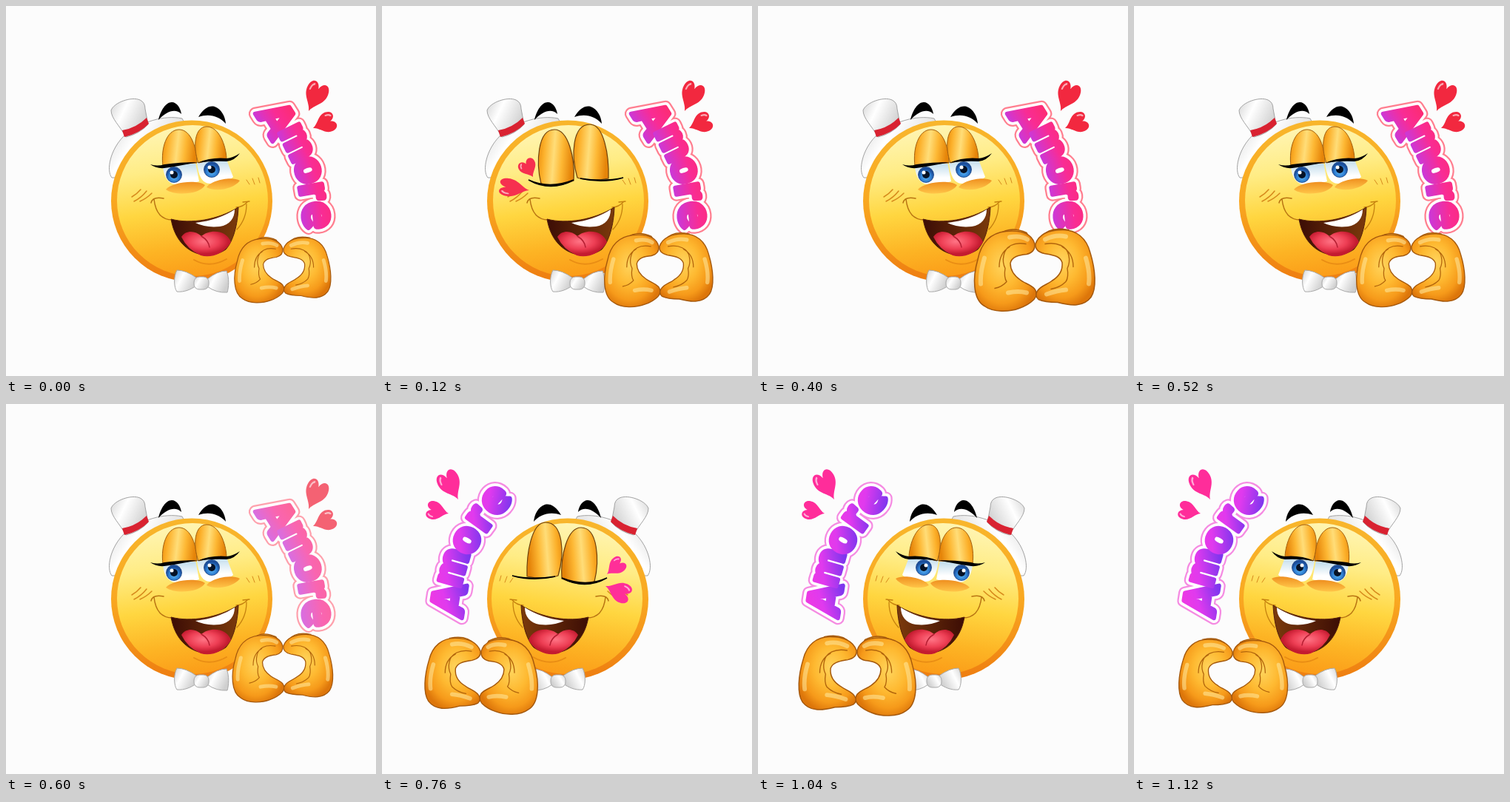
An HTML page for the animation above (1160 ms loop, 500x500 px).

```html
<!DOCTYPE html>
<html lang="it">
<head>
<meta charset="utf-8">
<title>Amore</title>
<style>
html, body { margin: 0; width: 100%; height: 100%; overflow: hidden; background: #fcfcfc; }
svg { display: block; width: 100vw; height: 100vh; }
text { font-family: Lato, "Open Sans", sans-serif; font-weight: 900; text-anchor: middle; stroke-linejoin: round; }
.line { fill: none; stroke-linecap: round; stroke-linejoin: round; }
</style>
</head>
<body>
<svg viewBox="0 0 500 500">
  <defs>
    <linearGradient id="rim" x2="0" y2="1">
      <stop offset="0" stop-color="#f8b62c"/><stop offset=".5" stop-color="#f9a821"/><stop offset="1" stop-color="#ee7d10"/>
    </linearGradient>
    <linearGradient id="skin" x1=".4" x2=".55" y2="1">
      <stop offset="0" stop-color="#fff5b4"/><stop offset=".28" stop-color="#ffec85"/>
      <stop offset=".55" stop-color="#ffd640"/><stop offset=".8" stop-color="#fdb424"/><stop offset="1" stop-color="#fb9c18"/>
    </linearGradient>
    <linearGradient id="lid" y2=".12">
      <stop offset="0" stop-color="#e98a0c"/><stop offset=".2" stop-color="#fcb02a"/>
      <stop offset=".48" stop-color="#ffdd78"/><stop offset=".72" stop-color="#fdb733"/><stop offset="1" stop-color="#e58409"/>
    </linearGradient>
    <linearGradient id="bag" x2="0" y2="1">
      <stop offset="0" stop-color="#ef8f20"/><stop offset="1" stop-color="#ffc548"/>
    </linearGradient>
    <linearGradient id="cloth" x2="1" y2=".5">
      <stop offset="0" stop-color="#d4d4d4"/><stop offset=".4" stop-color="#fff"/><stop offset="1" stop-color="#cfcfcf"/>
    </linearGradient>
    <linearGradient id="white" x2="0" y2="1">
      <stop offset="0" stop-color="#b9d8ea"/><stop offset=".7" stop-color="#fff"/>
    </linearGradient>
    <linearGradient id="mouth">
      <stop offset="0" stop-color="#3c0d05"/><stop offset="1" stop-color="#7b3a0c"/>
    </linearGradient>
    <radialGradient id="iris" cy=".65">
      <stop offset="0" stop-color="#5db7f5"/><stop offset=".65" stop-color="#2f7fd2"/><stop offset="1" stop-color="#1c4f9c"/>
    </radialGradient>
    <radialGradient id="tongue" cx=".45" cy=".4">
      <stop offset="0" stop-color="#ff7586"/><stop offset=".6" stop-color="#ee3f55"/><stop offset="1" stop-color="#c41b30"/>
    </radialGradient>
    <radialGradient id="hand" cx=".45" cy=".42" r=".62">
      <stop offset="0" stop-color="#ffd45c"/><stop offset=".45" stop-color="#feb931"/>
      <stop offset=".78" stop-color="#f69a1a"/><stop offset="1" stop-color="#dd760a"/>
    </radialGradient>
    <linearGradient id="warm" x2="0" y2="1">
      <stop offset="0" stop-color="#ff2c62"/><stop offset=".5" stop-color="#f92c94"/><stop offset="1" stop-color="#b93df2"/>
    </linearGradient>
    <linearGradient id="cool" x2=".3" y2="1">
      <stop offset="0" stop-color="#fb38d8"/><stop offset=".55" stop-color="#e03aee"/><stop offset="1" stop-color="#7f36ee"/>
    </linearGradient>
  </defs>

  <g id="rightWord"></g>
  <g id="leftWord"></g>

  <g id="head">
    <g fill="url(#cloth)" stroke="#a3a3a3">
      <path d="M143 232C135 222 141 194 159 176C182 156 214 147 238 152L248 170L160 232Z"/>
      <path d="M142 141C146 130 170 122 181 127Q188 130 188 139L192 160Q180 173 162 177C154 162 142 152 142 141Z"/>
      <path d="M157 168Q176 165 190 151L193 159Q181 172 160 177Z" fill="#d92231" stroke="none"/>
    </g>
    <path d="M206 154C209 141 216 130 224 130C231 130 236 138 237 146C229 138 217 142 206 154Z"/>
    <path d="M260 150C267 138 275 134 282 136C291 139 296 149 297 159C288 149 275 145 260 150Z"/>
    <circle cx="251" cy="263.500" r="109" fill="url(#rim)"/>
    <circle cx="252" cy="263" r="102" fill="url(#skin)"/>
    <g class="line" stroke="#d6891c" stroke-width="1.500">
      <path d="M170 258Q177 254 182 248M173 264Q183 259 190 250M181 264Q190 260 197 253"/>
      <path d="M325 235L329 241M333 233L336 241M341 232L343 239" stroke-width="1"/>
      <path d="M254 343Q275 355 298 342" stroke="#e98d14" stroke-width="2"/>
    </g>

    <g id="open">
      <path d="M212 215C213 233 220 242 234 241Q250 241 261 237L256 211Z" fill="url(#white)"/>
      <path d="M258 211C260 228 264 240 276 240Q298 240 307 231L297 205Z" fill="url(#white)"/>
      <g id="irises"></g>
      <path d="M216 248C224 238 258 234 269 242C262 255 228 257 216 248Z" fill="url(#bag)"/>
      <path d="M271 245C276 236 305 229 316 236C308 247 284 252 271 245Z" fill="url(#bag)"/>
      <g fill="url(#lid)" stroke="#a35f0d">
        <path d="M212 216C209 192 217 167 234 167C250 167 258 192 258 212Q234 213 212 216Z"/>
        <path d="M260 212C252 190 255 163 271 163C288 163 297 188 298 206Q278 207 260 212Z"/>
      </g>
      <path d="M195 214Q205 217 214 214Q235 211 259 211Q235 216 214 219Q203 220 195 214Z"/>
      <path d="M258 212Q278 204 298 206Q307 205 316 199Q309 209 298 210Q278 209 258 212Z"/>
    </g>

    <g id="shut">
      <g fill="url(#lid)" stroke="#6e400c" stroke-width="1.200">
        <path d="M215 240C208 212 210 167 233 167C252 167 261 206 259 236Q235 247 215 240Z"/>
        <path d="M264 232C255 202 257 160 281 160C300 160 307 202 306 233Q282 238 264 232Z"/>
      </g>
      <path d="M198 235Q226 248 259 235Q228 252 198 235Z" stroke="#000" stroke-width="1.500"/>
      <path d="M268 233Q300 238 326 232Q298 240 268 233Z" stroke="#000" stroke-width="1.500"/>
    </g>

    <path class="line" d="M196 266Q198 257 213 260M200 261C202 279 210 289 225 289" stroke="#b87412" stroke-width="1.500"/>
    <path class="line" d="M311 272Q320 272 327 264M320 265L329 264M325 268Q325 288 312 302" stroke="#c5810f" stroke-width="1.300"/>
    <path d="M223 288C250 295 286 289 314 272C313 296 307 318 297 329C272 346 231 335 223 288Z" fill="url(#mouth)" stroke="#54200a"/>
    <path d="M237 312C244 302 256 304 264 311C274 302 297 301 304 319C294 336 276 341 263 337Q245 329 237 312Z" fill="url(#tongue)"/>
    <path class="line" d="M264 311Q274 317 275 326" stroke="#b51e32" stroke-width="1.500"/>
    <path d="M256 293Q288 289 309 275C309 287 302 296 289 298Q270 300 256 293Z" fill="#fff"/>
    <g fill="url(#cloth)" stroke="#a9a9a9">
      <path d="M231 357C226 366 227 381 231 386C241 387 250 383 257 378L257 367Q243 357 231 357Z"/>
      <path d="M272 369Q286 358 298 358C302 368 301 380 299 387Q284 388 272 379Z"/>
      <rect x="254" y="366" width="20" height="17" rx="7"/>
    </g>
  </g>

  <g id="rightHearts"></g>
  <g id="leftHearts"></g>

  <g id="hands">
    <g fill="url(#hand)" stroke="#a4580c" stroke-width="1.500">
      <path d="M325 308Q342 296 363 306L369 316Z"/>
      <path d="M383 311Q395 297 419 302L400 314Z"/>
      <path d="M374 321C370 307 355 302 335 304C316 306 302 317 297 342C290 366 290 396 306 405C318 414 340 413 353 408Q365 404 373 396Q379 389 374 382C369 376 360 374 355 370C346 364 341 356 341 347C343 338 353 336 363 335Q375 332 374 321Z"/>
      <path d="M375 321C380 307 395 302 412 302C430 302 444 313 449 333C456 356 458 381 450 393C440 406 424 405 405 400Q387 400 379 396Q373 391 378 384C383 377 391 376 397 371C407 365 412 356 411 346C408 337 398 336 387 334Q374 331 375 321Z"/>
    </g>
    <g class="line" stroke="#b2650c" stroke-width="1.400">
      <path d="M362 321C346 318 334 324 332 337Q330 346 334 354Q332 366 336 372Q330 379 320 381M340 325Q326 333 326 352"/>
      <path d="M388 321C404 318 418 324 420 337Q422 346 418 354Q420 366 416 372Q408 380 396 382M411 325Q426 333 426 352"/>
    </g>
    <g class="line" stroke="#ffeaa0" opacity=".55" stroke-width="6">
      <path d="M340 312Q355 309 364 315M306 340Q300 360 301 375M338 387Q352 384 363 387"/>
      <path d="M388 315Q402 308 416 311M443 340Q449 360 447 375M390 389Q404 384 416 383"/>
    </g>
  </g>
</svg>
<script>
const LOOP = 1160, STEP = 40, FLIP = 640;
const $ = id => document.getElementById(id);
const show = (id, on) => $(id).setAttribute("display", on ? "inline" : "none");

// Tip position, tilt, and width and height factors.
const heart = (x, y, angle, sx, sy, color) =>
  `<g transform="translate(${x} ${y}) rotate(${angle}) scale(${sx} ${sy})">
    <path d="M0 0C-4 -11 -21 -16 -20 -30C-19 -43 -4 -44 0 -32C4 -44 19 -43 20 -30C21 -16 4 -11 0 0Z" fill="${color}"/>
    <path class="line" d="M-14 -28Q-14 -34 -10 -36" stroke="#fff" stroke-width="3" opacity=".6"/></g>`;

// Letters are [character, centre x, centre y, tilt, font size].
function word(letters, fill, ring) {
  const layer = (paint, stroke, width) => letters.map(([char, x, y, angle, size]) =>
    `<text transform="translate(${x} ${y}) rotate(${angle})" y="${size * (char === "A" ? .36 : .26)}"
      font-size="${size}" fill="${paint}" stroke="${stroke}" stroke-width="${width}">${char}</text>`).join("");
  return layer(ring, ring, 18) + layer("#fff", "#fff", 13.500) + layer(fill, fill, 6);
}

const iris = (x, y) =>
  `<circle cx="${x}" cy="${y}" r="10.500" fill="url(#iris)" stroke="#1c4583" stroke-width=".8"/>
   <circle cx="${x}" cy="${y}" r="5" fill="#061226"/>
   <circle cx="${x - 3}" cy="${y - 3}" r="2.500" fill="#fff"/>`;

$("irises").innerHTML = iris(227, 228) + iris(278, 221);
$("rightWord").innerHTML = word([
  ["A", 367, 153, 58, 60], ["m", 392, 185, 64, 57], ["o", 408, 222, 72, 59],
  ["r", 413, 251, 80, 60], ["e", 419, 283, 84, 66]
], "url(#warm)", "#ff7f90")
  + heart(409, 142, 24, .75, 1.02, "#f2283f") + heart(415, 165, 68, .68, .78, "#f2283f");
$("leftWord").innerHTML = word([
  ["A", 90, 264, -81, 60], ["m", 97, 221, -74, 58], ["o", 115, 184, -62, 60],
  ["r", 133, 156, -54, 62], ["e", 154, 131, -47, 63]
], "url(#cool)", "#f58be2")
  + heart(103, 129, -28, .75, 1.02, "#ff2d9a") + heart(90, 148, -78, .62, .74, "#ff2d9a");
$("rightHearts").innerHTML = heart(199, 249, -82, .6, 1, "#f6304f") + heart(204, 231, -28, .6, .62, "#f6304f");
$("leftHearts").innerHTML = heart(302, 246, 112, .68, .88, "#ff2f98") + heart(304, 230, 50, .56, .7, "#ff2f98");

function draw(now) {
  const t = Math.floor(now % LOOP / STEP) * STEP;
  const left = t >= FLIP;
  const shut = left ? t >= 720 && t < 1000 : t >= 120 && t < 360;
  const width = left ? 177 - Math.abs(t - 920) * .14 : 176 - Math.abs(t - 320) * .1375;
  const size = width / 165;

  show("rightWord", !left);
  show("leftWord", left);
  $("rightWord").setAttribute("opacity", t === FLIP - STEP ? .72 : 1);
  show("open", !shut);
  show("shut", shut);
  show("rightHearts", shut && !left);
  show("leftHearts", shut && left);
  $("head").setAttribute("transform", left ? "translate(502 0) scale(-1 1)" : "");
  $("hands").setAttribute("transform",
    `translate(${left ? "134 366" : "374 355.5"}) scale(${left ? -size : size} ${size}) translate(-374 -355)`);
}

function tick() {
  draw(performance.now());
  requestAnimationFrame(tick);
}
tick();
</script>
</body>
</html>
```
